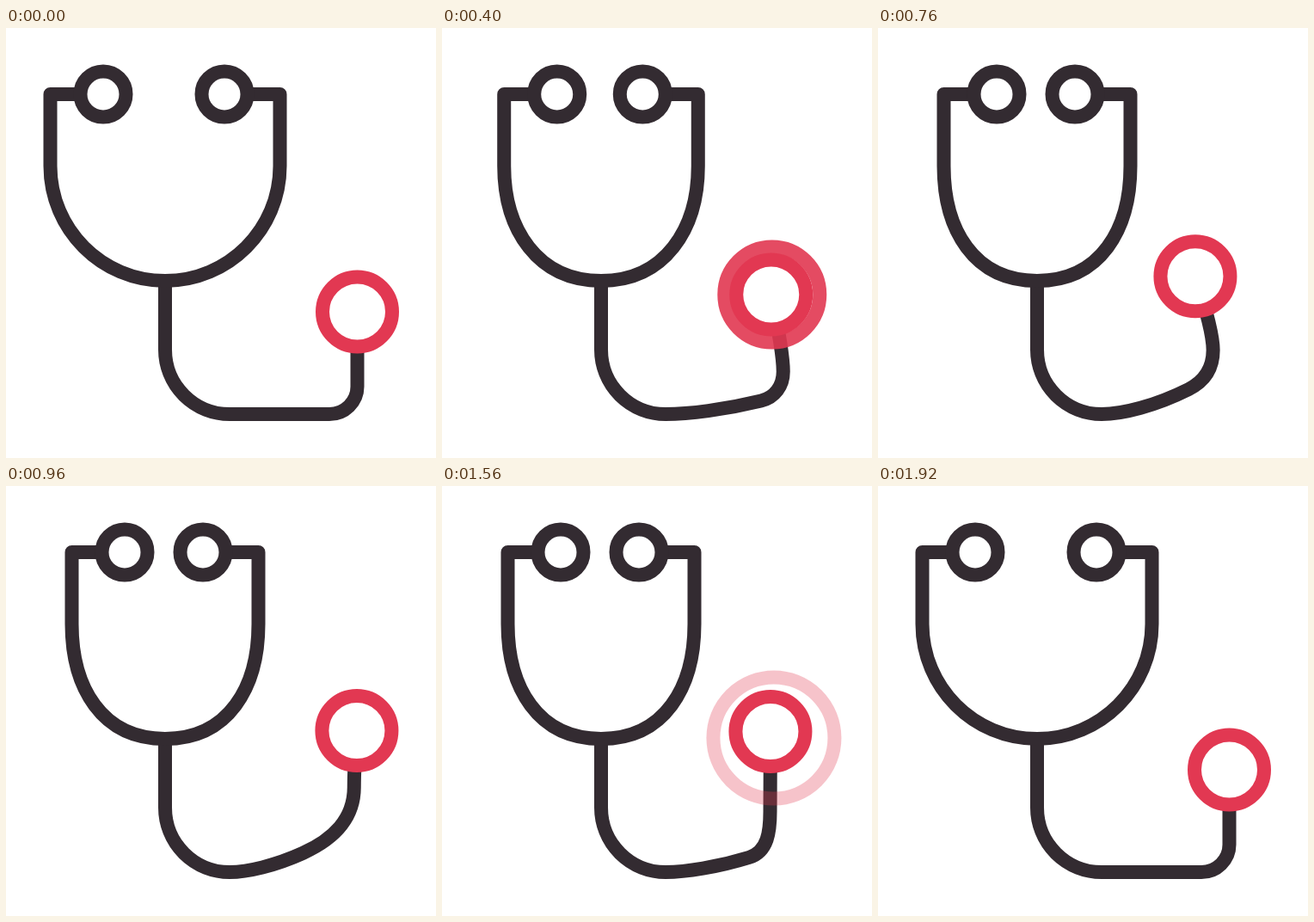
Recreate the animation shown at these times as an HTML page. Size 500x500 px, loop 2000 ms.

```html
<!DOCTYPE html>
<html lang="en">
<head>
<meta charset="utf-8">
<title>Stethoscope</title>
<style>
  html, body { margin: 0; width: 100%; height: 100%; overflow: hidden; background: #fff; }
  svg { display: block; width: 100vw; height: 100vh; }
  path, circle { fill: none; stroke: #332b31; stroke-width: 16; stroke-linejoin: round; }
  .red { stroke: #e23852; }
</style>
</head>
<body>
<svg viewBox="0 0 500 500">
  <path id="cable"/>
  <path id="yoke"/>
  <circle id="earL" cy="77" r="26.5"/>
  <circle id="earR" cy="77" r="26.5"/>
  <circle id="pulse" class="red"/>
  <circle id="chest" class="red" r="40.5" style="fill:#fff"/>
</svg>
<script>
const LOOP = 2000, STEP = 40, MID = 185, RADIUS = 133.5;
const BEATS = [160, 1080], BEAT = 600;

// Each pose: chest piece centre, start and end of the upper cable bend.
const rest = [408.5, 330, 376, 449, 408.5, 417];
const poses = [
  { at: 140, points: rest },
  { at: 660, points: [357, 290, 366, 418, 385, 382] },
  { at: 980, points: [408.5, 284.5, 345, 427, 405, 350] },
  { at: 1425, points: [376, 275.5, 353, 428, 375.5, 370] },
  { at: 1920, points: rest }
];

const clamp = u => Math.min(1, Math.max(0, u));
const mix = (a, b, u) => a + (b - a) * u;
function ease(t, from, to) {
  const u = clamp((t - from) / (to - from));
  return u * u * (3 - 2 * u);
}
function set(id, attrs) {
  const node = document.getElementById(id);
  for (const name in attrs) node.setAttribute(name, attrs[name]);
}

function poseAt(t) {
  const next = Math.max(1, poses.findIndex(p => p.at > t));
  const b = t < LOOP && t >= 1920 ? poses[poses.length - 1] : poses[next];
  const a = poses[poses.indexOf(b) - 1];
  const u = ease(t, a.at, b.at);
  return a.points.map((v, i) => mix(v, b.points[i], u));
}

// The cable leaves the lower bend level, rises to the upper bend and ends under the chest piece.
function cablePath([x, y, ax, ay, bx, by]) {
  const dx = ax - 260, dy = ay - 449, slope = 1.75 * dy / dx;
  const reach = 0.39 * Math.hypot(bx - ax, by - ay);
  const run = reach / Math.hypot(1, slope);
  return `M${MID} 294V374A75 75 0 0 0 260 449` +
    `C${260 + 0.24 * dx} 449 ${ax - 0.38 * dx} ${ay - 0.38 * dx * slope} ${ax} ${ay}` +
    `C${ax + run} ${ay + run * slope} ${bx} ${by + reach} ${bx} ${by}` +
    `Q${bx} ${by - 23} ${x} ${y}`;
}

// The handles at the bottom keep their length while the sides move in.
function yokePath(left, right) {
  const handle = 0.552 * RADIUS, side = 160.5 + handle;
  return `M${left + 32} 77H${left}V160.5C${left} ${side} ${MID - handle} 294 ${MID} 294` +
    `S${right} ${side} ${right} 160.5V77H${right - 32}`;
}

function draw(t) {
  const pose = poseAt(t), [x, y] = pose;
  set('chest', { cx: x, cy: y });
  set('cable', { d: cablePath(pose) });

  const half = RADIUS - 25 * (ease(t, 120, 500) - ease(t, 1560, 1880));
  const left = MID - half, right = MID + half;
  set('yoke', { d: yokePath(left, right) });
  set('earL', { cx: left + 61.5 });
  set('earR', { cx: right - 64.5 });

  const start = BEATS.find(b => t >= b && t < b + BEAT);
  const age = start === undefined ? BEAT : t - start;
  const drift = t / 1560;
  set('pulse', {
    cx: x + 4 * drift, cy: y + 7.5 * drift ** 5, r: 40.5 + age / 16,
    opacity: clamp((BEAT - age) / 400)
  });
}

const origin = performance.now();
function tick() {
  const t = (performance.now() - origin) % LOOP;
  draw(t - t % STEP);
  requestAnimationFrame(tick);
}
tick();
</script>
</body>
</html>
```
